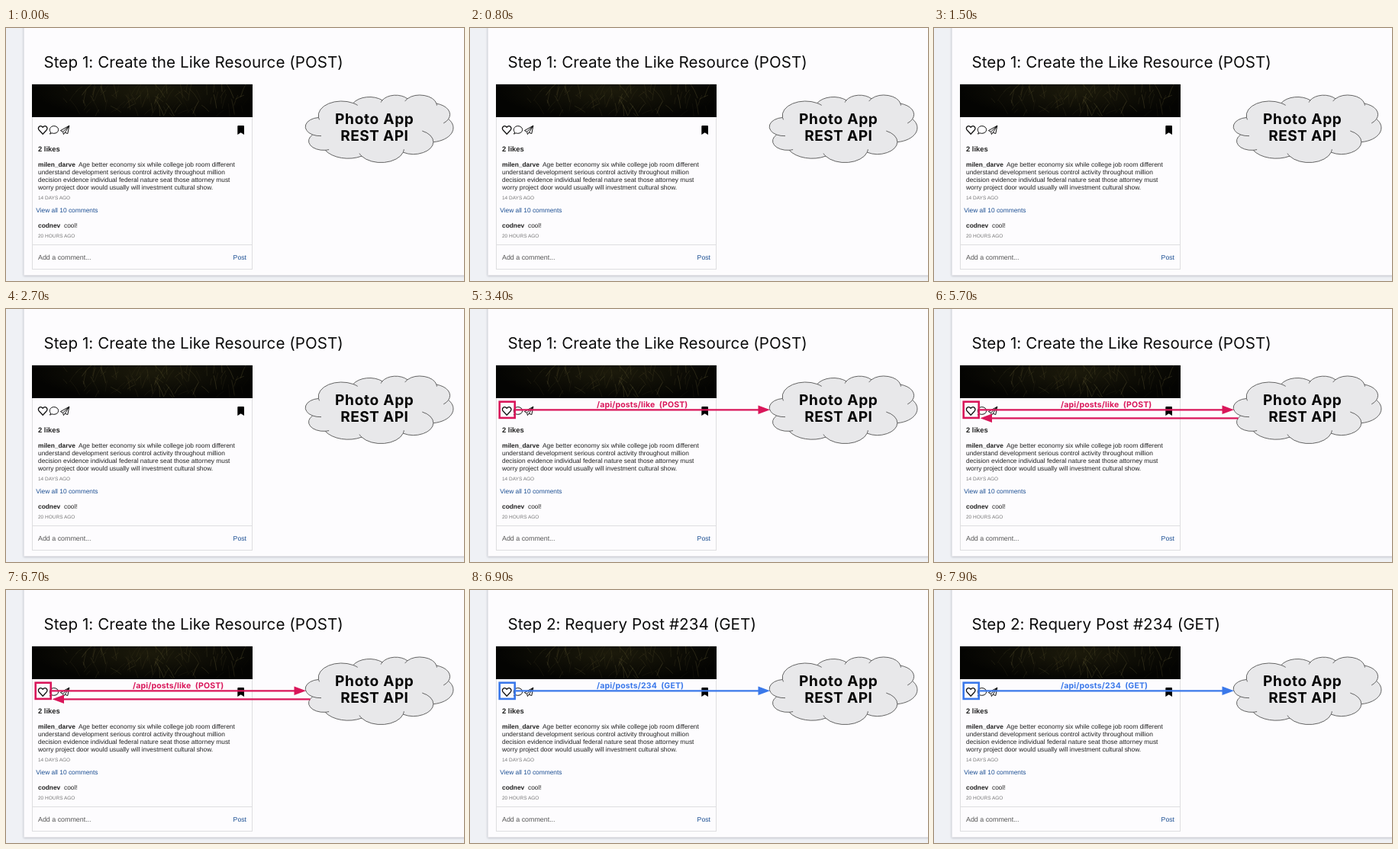
Write an HTML page that moves like this. It is 600x332 px and loops after 8000 ms.

```html
<!DOCTYPE html>
<html lang="en">
<head>
<meta charset="utf-8">
<title>Like a post</title>
<style>
  html, body { margin: 0; width: 100%; height: 100%; overflow: hidden; background: #eff1f5; }
  svg { display: block; }
  text { white-space: pre; text-rendering: geometricPrecision; }

  .title { font: 400 20.6px Inter, sans-serif; letter-spacing: .05px; fill: #0c0c0c; }
  .cloud { fill: #e8e8ea; stroke: #555; stroke-width: .9; }
  .cloud path { vector-effect: non-scaling-stroke; }
  .api { font: 700 19.1px Inter, sans-serif; text-anchor: middle; fill: #060606; }
  .route { font: 700 10.5px Inter, sans-serif; letter-spacing: .15px; fill: currentColor; }

  .card text { font: 8.37px "Liberation Sans", Arial, sans-serif; fill: #222; }
  .card .bold { font-weight: 700; }
  .card .likes { font-size: 9.4px; font-weight: 700; }
  .card .ago { font-size: 6.5px; fill: #777; }
  .card .link { fill: #1c4f93; }
  .card .field { font-size: 8.9px; fill: #555; }
  .icons { fill: none; stroke: #111; stroke-width: 1.3; stroke-linejoin: round; }

  .post { color: #d9165a; }
  .get { color: #3a78ea; }
  .box { fill: none; stroke: currentColor; stroke-width: 2.6; }
  .line { stroke: currentColor; stroke-width: 2.2; }
  .head { fill: currentColor; }

  .step1, .request, .response, .step2 { animation: 8s step-end infinite; }
  .step1 { animation-name: step1; }
  .request { animation-name: request; }
  .response { animation-name: response; }
  .step2 { animation-name: step2; }
  @keyframes step1 { 0% { opacity: 1 } 86.25%, 100% { opacity: 0 } }
  @keyframes request { 0% { opacity: 0 } 42.5% { opacity: 1 } 86.25%, 100% { opacity: 0 } }
  @keyframes response { 0% { opacity: 0 } 71.25% { opacity: 1 } 86.25%, 100% { opacity: 0 } }
  @keyframes step2 { 0% { opacity: 0 } 86.25%, 100% { opacity: 1 } }
</style>
</head>
<body>
<svg width="600" height="332" viewBox="0 0 600 332">
  <defs>
    <radialGradient id="glow" cx=".5" cy=".4" r=".5">
      <stop offset="0" stop-color="#1c1a0b"/>
      <stop offset="1" stop-color="#1c1a0b" stop-opacity="0"/>
    </radialGradient>
    <filter id="shade" x="-5%" y="-5%" width="110%" height="110%">
      <feGaussianBlur stdDeviation="1.5"/>
    </filter>
    <clipPath id="frame"><rect x="34" y="74" width="289" height="43"/></clipPath>
    <g id="call">
      <rect class="box" x="38.7" y="121.7" width="20" height="21.2"/>
      <path class="line" d="M59 132.3H380"/>
      <path class="head" d="M377.5 126.6 393 132.3 377.5 138z"/>
    </g>
  </defs>

  <rect width="600" height="332" fill="#eff1f5"/>
  <rect x="23" y="-10" width="600" height="335.5" fill="#b9bcc4" filter="url(#shade)"/>
  <rect x="23.5" y="-10" width="600" height="334.5" fill="#fdfcfe"/>

  <g class="title">
    <text class="step1" x="49.5" y="52">Step 1: Create the Like Resource (POST)</text>
    <text class="step2" x="49.5" y="52">Step 2: Requery Post #234 (GET)</text>
  </g>

  <g class="card">
    <rect x="34.5" y="73.5" width="288" height="243" fill="#fdfcfe" stroke="#dedee0"/>
    <g clip-path="url(#frame)">
      <rect x="34" y="74" width="289" height="43" fill="#040402"/>
      <ellipse cx="185" cy="90" rx="150" ry="36" fill="url(#glow)"/>
      <g id="grass" fill="none" stroke="#7d7444"></g>
    </g>

    <g class="icons">
      <path d="M48.2 139.2 43.6 134.3C40.6 130.8 44.6 126.2 48.2 130.2 51.8 126.2 55.8 130.8 52.8 134.3z"/>
      <path d="M58.6 137C55.6 133.4 58 128.6 62.8 128.6 66.2 128.6 68.6 130.8 68.6 133.5 68.6 136.3 66 138.3 62.8 138.3 61.7 138.3 60.8 138.1 60 137.8 59.2 138.6 58.2 139 57.2 139 58 138.4 58.4 137.8 58.6 137z" stroke-width="1"/>
      <path d="M82.8 128.2 71.4 134.6 74.6 136.2 75.4 139.6 77.2 137.2 80.8 138.6zM82.8 128.2 74.6 136.2M82.8 128.2 77.2 137.2" stroke-width="1"/>
    </g>
    <path d="M304.3 128H311Q312 128 312 129V140L307.6 137.3 303.3 140V129Q303.3 128 304.3 128z" fill="#000"/>

    <text class="likes" x="42" y="162.3">2 likes</text>
    <text class="bold" x="42" y="182">milen_darve</text>
    <text x="95" y="182">Age better economy six while college job room different</text>
    <text x="42" y="192">understand development serious control activity throughout million</text>
    <text x="42" y="202">decision evidence individual federal nature seat those attorney must</text>
    <text x="42" y="212">worry project door would usually will investment cultural show.</text>
    <text class="ago" x="42" y="225">14 DAYS AGO</text>
    <text class="link" x="39.3" y="241.8">View all 10 comments</text>
    <text class="bold" x="42" y="262">codnev</text>
    <text x="76" y="262">cool!</text>
    <text class="ago" x="42" y="275">20 HOURS AGO</text>
    <path d="M35 284.5H322" stroke="#dedee0"/>
    <text class="field" x="42" y="304">Add a comment...</text>
    <text class="link" x="297.6" y="304" style="font-size:8.7px">Post</text>
  </g>

  <g class="cloud" transform="translate(392 88) scale(.00898 .0041)">
    <path d="M1950 7185A2172 2972 0 0 0 1080 12690A2180 2959 0 0 0 2910 17640A3860 5271 0 0 0 8235 19545A3376 4607 0 0 0 14280 18330A2892 3933 0 0 0 18690 15045A3387 4610 0 0 0 20895 7665A2666 3636 0 0 0 19140 2715A2428 3297 0 0 0 14910 1170A2182 2972 0 0 0 11250 1665A2666 3633 0 0 0 7005 2580A3376 4595 0 0 0 1950 7185z"/>
    <path fill="none" d="M1080 12690A2172 2972 0 0 0 2340 13080M2910 17640A2180 2959 0 0 0 3465 17445M7905 18675A3376 4607 0 0 0 8235 19545M14280 18330A3376 4607 0 0 0 14400 17370M18690 15045A2892 3933 0 0 0 17064 11477M20175 9015A2666 3636 0 0 0 20895 7665M19200 3345A2428 3297 0 0 0 19140 2715M14910 1170A2428 3297 0 0 0 14550 1980M11250 1665A2182 2972 0 0 0 11040 2340M7650 3270A3376 4595 0 0 0 7005 2580M1950 7185A3376 4595 0 0 0 2070 7890"/>
  </g>
  <g class="api">
    <text x="482.8" y="125.8" letter-spacing=".7">Photo App</text>
    <text x="482.8" y="148.2" letter-spacing=".4">REST API</text>
  </g>

  <g class="post">
    <g class="request">
      <use href="#call"/>
      <text class="route" x="166" y="128.6">/api/posts/like  (POST)</text>
    </g>
    <g class="response">
      <path class="line" d="M398.5 143.3H74"/>
      <path class="head" d="M76 137.6 60.5 143.3 76 149z"/>
    </g>
  </g>
  <g class="get step2">
    <use href="#call"/>
    <text class="route" x="166" y="128.6">/api/posts/234  (GET)</text>
  </g>
</svg>
<script>
  // Seeded blades of grass, short and leaning both ways
  let seed = 11;
  const rand = () => (seed = seed * 16807 % 2147483647) / 2147483647;
  const mix = (a, b) => a + (b - a) * rand();
  const grass = document.getElementById('grass');

  for (let i = 0; i < 110; i++) {
    const x = mix(80, 310);
    const y = mix(82, 118);
    const lean = mix(-14, 14);
    const rise = mix(5, 22);
    const blade = document.createElementNS('http://www.w3.org/2000/svg', 'path');
    blade.setAttribute('d', `M${x} ${y}q${lean * .4} ${-rise * .6} ${lean} ${-rise}`);
    blade.setAttribute('stroke-width', mix(.3, .9));
    blade.setAttribute('opacity', mix(.08, .4));
    grass.append(blade);
  }
</script>
</body>
</html>
```
